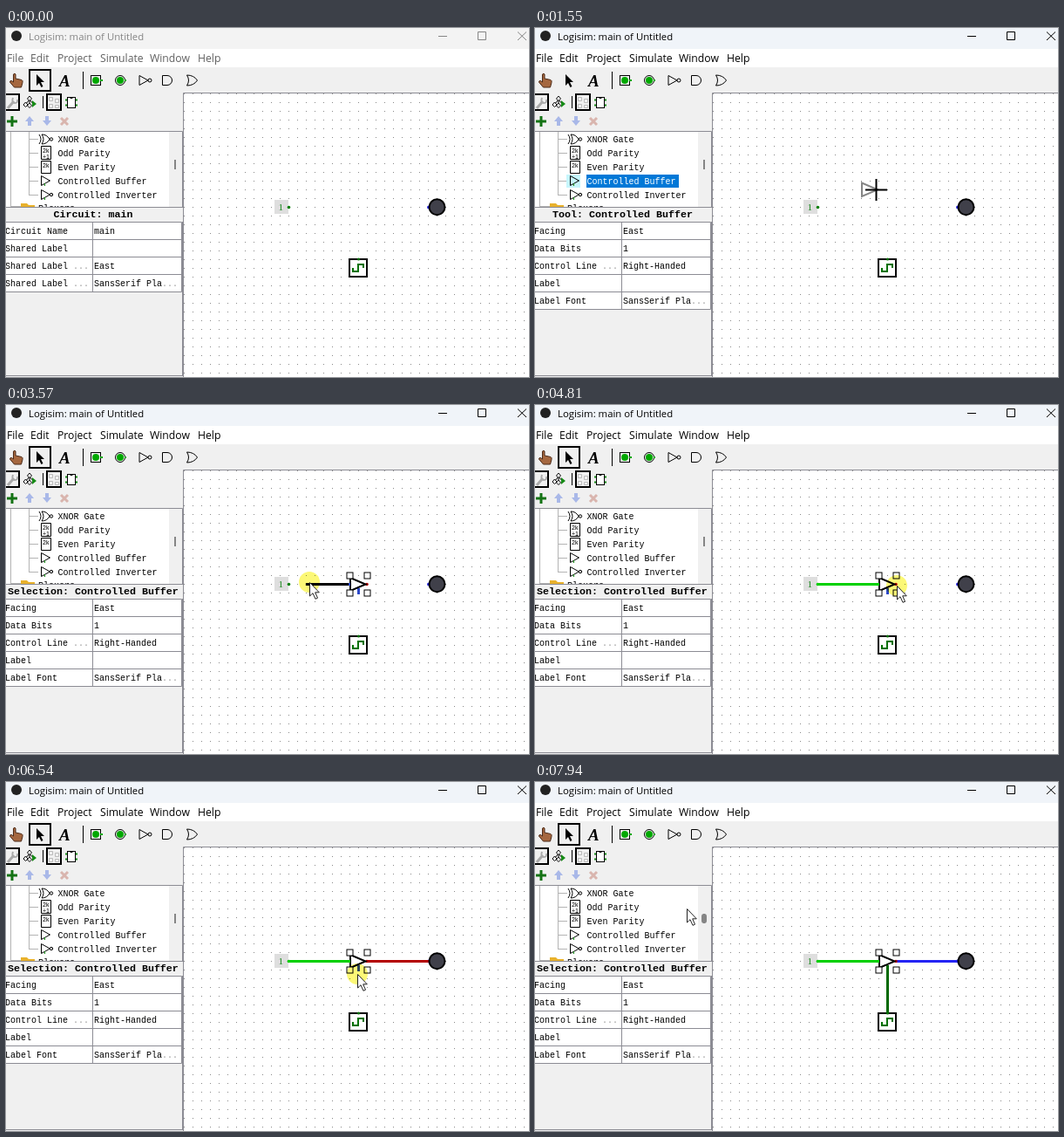
Animation, 600 px wide and 400 px high, one loop 8000 ms. Source, as an HTML page:

```html
<!DOCTYPE html>
<html lang="en">
<head>
<meta charset="utf-8">
<title>Controlled buffer wiring</title>
<style>
html, body { margin: 0; width: 100%; height: 100%; overflow: hidden; }
svg { display: block; width: 600px; height: 400px; }
.ui { font: 12.2px "Open Sans", "Noto Sans", sans-serif; }
.mono { font: 10px "Liberation Mono", "DejaVu Sans Mono", monospace; white-space: pre; }
.head { font: bold 11.67px "Liberation Mono", monospace; }
.line { fill: none; stroke: #000; }
.pane { fill: none; stroke: #8c8c94; }
.dots { fill: #999; }

/* Everything shares one 8 s clock; states switch hard. */
.on, .title, .menu, .move { animation: 8s step-end infinite; }
.on { visibility: hidden; }

.title { animation-name: title; }
@keyframes title { 0% { color: #858585 } 8.5%, 100% { color: #000 } }
.menu { animation-name: menu; }
@keyframes menu { 0% { color: #606060 } 8.5%, 100% { color: #000 } }

.idle { animation-name: idle; }
@keyframes idle { 0% { visibility: visible } 8.5%, 100% { visibility: hidden } }
.tool { animation-name: tool; }
@keyframes tool { 0%, 30%, 100% { visibility: hidden } 8.5% { visibility: visible } }
.gate { animation-name: gate; }
@keyframes gate { 0% { visibility: hidden } 8.5%, 100% { visibility: visible } }
.placed { animation-name: placed; }
@keyframes placed { 0% { visibility: hidden } 30%, 100% { visibility: visible } }
.select { animation-name: select; }
@keyframes select { 0%, 30%, 100% { visibility: visible } 8.5% { visibility: hidden } }

.cross { animation-name: cross; }
@keyframes cross { 0%, 30%, 100% { visibility: hidden } 16.4% { visibility: visible } }
.arrow { animation-name: arrow; }
@keyframes arrow { 0%, 30%, 100% { visibility: visible } 16.4% { visibility: hidden } }
.press { animation-name: press; }
@keyframes press {
  0%, 10.5%, 31%, 51.375%, 71%, 92.5%, 100% { visibility: hidden }
  8.5%, 30%, 41.625%, 60.125%, 81.75% { visibility: visible }
}

.high { animation-name: high; }
@keyframes high { 0% { visibility: hidden } 51.375%, 100% { visibility: visible } }
.error { animation-name: error; }
@keyframes error { 0%, 92.5%, 100% { visibility: hidden } 71% { visibility: visible } }
.float { animation-name: float; }
@keyframes float { 0% { visibility: hidden } 92.5%, 100% { visibility: visible } }
.hover { animation-name: hover; }
@keyframes hover { 0% { visibility: hidden } 98.25%, 100% { visibility: visible } }

.drag1 { animation-name: drag1; transform-origin: 395px 205px; }
@keyframes drag1 {
  0% { transform: scaleX(0) }
  41.625% { transform: scaleX(0); animation-timing-function: steps(3, jump-both) }
  44.625% { transform: scaleX(.72) }
  45.625% { transform: scaleX(.72); animation-timing-function: steps(2, jump-both) }
  47.625% { transform: scaleX(1) }
  51.375%, 100% { transform: scaleX(0) }
}
.drag2 { animation-name: drag2; transform-origin: 413px 205px; }
@keyframes drag2 {
  0% { transform: scaleX(0) }
  61.125% { transform: scaleX(0); animation-timing-function: steps(6, jump-both) }
  67.125% { transform: scaleX(1) }
  71%, 100% { transform: scaleX(0) }
}
.drag3 { animation-name: drag3; transform-origin: 404px 214px; }
@keyframes drag3 {
  0% { transform: scaleY(0) }
  82.75% { transform: scaleY(0); animation-timing-function: steps(7, jump-both) }
  89.625% { transform: scaleY(1) }
  92.5%, 100% { transform: scaleY(0) }
}

.pointer { animation-name: pointer; }
@keyframes pointer {
  0% { transform: translate(622px, 331px) }
  .875% { transform: translate(622px, 331px); animation-timing-function: steps(6, jump-both) }
  6.625% { transform: translate(48px, 176px) }
  11.5% { transform: translate(48px, 176px); animation-timing-function: steps(7, jump-both) }
  18.375% { transform: translate(281px, 185px) }
  19.375% { transform: translate(391px, 185px) }
  20.375% { transform: translate(391px, 185px); animation-timing-function: steps(6, jump-both) }
  26.25% { transform: translate(414px, 205px) }
  31% { transform: translate(414px, 205px); animation-timing-function: steps(4, jump-both) }
  34.875% { transform: translate(404px, 222px) }
  35.875% { transform: translate(404px, 222px); animation-timing-function: steps(3, jump-both) }
  38.875% { transform: translate(391px, 204px) }
  41.625% { transform: translate(391px, 204px); animation-timing-function: steps(3, jump-both) }
  44.625% { transform: translate(348px, 203px) }
  45.625% { transform: translate(348px, 203px); animation-timing-function: steps(2, jump-both) }
  47.625% { transform: translate(327px, 204px) }
  51.375% { transform: translate(327px, 204px); animation-timing-function: steps(7, jump-both) }
  58.125% { transform: translate(415px, 207px) }
  61.125% { transform: translate(415px, 207px); animation-timing-function: steps(6, jump-both) }
  67.125% { transform: translate(482px, 206px) }
  71% { transform: translate(482px, 206px); animation-timing-function: steps(7, jump-both) }
  77.75% { transform: translate(403px, 220px) }
  82.75% { transform: translate(403px, 220px); animation-timing-function: steps(7, jump-both) }
  89.625% { transform: translate(406px, 264px) }
  94.5% { transform: translate(406px, 264px); animation-timing-function: steps(5, jump-both) }
  99.25%, 100% { transform: translate(174px, 145px) }
}
</style>
</head>
<body>
<svg viewBox="0 0 600 400">
  <defs>
    <pattern id="grid" x="204" y="75" width="10" height="10" patternUnits="userSpaceOnUse">
      <rect width="1" height="1" fill="#8a8a8a"/>
    </pattern>
    <clipPath id="tree"><rect y="119" width="187" height="86"/></clipPath>
    <path id="buf" d="M0 -5.5V5.5L10 0Z"/>
    <path id="or" d="M0 -6Q8 -6 12 0Q8 6 0 6Q4 0 0 -6Z"/>
    <rect id="handle" x="-3.5" y="-3.5" width="7" height="7" fill="#fff" stroke="#000"/>
  </defs>

  <rect width="600" height="400" fill="#f0f0f0"/>
  <rect width="600" height="24" fill="#f0f4f9"/>
  <rect class="on idle" width="600" height="24" fill="#f3f3f3"/>
  <rect y="24" width="600" height="21" fill="#fff"/>

  <!-- window frame and menu -->
  <circle cx="12" cy="9" r="6" fill="#222"/>
  <g class="title">
    <text class="ui" x="26" y="14" style="font-size:11.35px" fill="currentColor">Logisim: main of Untitled</text>
    <path d="M496 9.5H506M541.5 4.5H550.5V13.5H541.5ZM587 4.5L597 14M597 4.5L587 14" fill="none" stroke="currentColor"/>
  </g>
  <g class="menu">
    <g class="ui" fill="currentColor">
      <text x="1" y="39">File</text>
      <text x="28" y="39">Edit</text>
      <text x="59" y="39">Project</text>
      <text x="108" y="39">Simulate</text>
      <text x="165" y="39">Window</text>
      <text x="220" y="39">Help</text>
    </g>
  </g>

  <!-- main toolbar -->
  <path d="M8.5 53q1.5-1.5 2.5 0v5l7 1.5q1.5 .5 1 3l-1.5 5.5h-8l-5-6q0-2 2-1.5l2 1.5z" fill="#a5673f" stroke="#4b2a18"/>
  <rect class="on select line" x="27" y="48" width="24" height="24" stroke-width="2"/>
  <path d="M35 53V66L38 63L40.5 68L42.5 67L40 62H44Z"/>
  <text x="61" y="67" font-family="Liberation Serif, serif" font-size="19" font-weight="bold" font-style="italic">A</text>
  <path class="line" d="M88.5 50V70" stroke="#888"/>
  <rect class="line" x="97.5" y="54.5" width="11" height="11"/>
  <circle cx="103" cy="60" r="4" fill="#00a800"/>
  <circle class="line" cx="131" cy="60" r="5.5"/>
  <circle cx="131" cy="60" r="4" fill="#00a800"/>
  <path d="M108 60H111M136 60H138" stroke="#00a800" stroke-width="2"/>
  <use href="#buf" class="line" x="153" y="60"/>
  <circle class="line" cx="165" cy="60" r="2"/>
  <path class="line" d="M179.5 54.5H185A5.5 5.5 0 0 1 185 65.5H179.5Z"/>
  <use href="#or" class="line" x="207.5" y="60"/>

  <!-- explorer toolbars -->
  <rect class="line" x="-1" y="76" width="16" height="18" stroke-width="2"/>
  <path d="M2 92L9 84" stroke="#aaa" stroke-width="3"/>
  <path d="M8 80Q6 85 10 86Q14 86 13 82" fill="none" stroke="#aaa" stroke-width="2"/>
  <path class="line" d="M27 82L22 88M27 82L32 88M27 82V90"/>
  <path d="M27 78l2.5 3-2.5 2.5-2.5-2.5zM22.5 85l2.5 3-2.5 2.5-2.5-2.5zM27 86l2.5 3-2.5 2.5-2.5-2.5z" fill="#fff" stroke="#000"/>
  <path d="M30 83l5 4-5 4z" fill="#168b16"/>
  <path class="line" d="M42.5 78V92" stroke="#888"/>
  <rect class="line" x="47" y="76" width="16" height="18" stroke-width="2"/>
  <path d="M49.5 79.5h4v4h-4zM56.5 81.5h4v4h-4zM49.5 87.5h4v4h-4zM56.5 88.5h4v3h-4z" fill="none" stroke="#bbb"/>
  <rect x="70.5" y="79.5" width="9" height="12" fill="#fff" stroke="#000"/>
  <path d="M73 79.5q2 3 4 0" class="line"/>
  <path d="M68 82.5h2M68 88.5h2M80 82.5h2M80 88.5h2" stroke="#168b16" stroke-width="2"/>
  <path d="M7 101V113M1 107H13" stroke="#147314" stroke-width="3"/>
  <path id="up" d="M27 101L32 107H29V112H25V107H22Z" fill="#a9b8e8"/>
  <use href="#up" transform="matrix(1 0 0 -1 20 213)"/>
  <path d="M63 103L71 111M71 103L63 111" stroke="#d9b5ae" stroke-width="3"/>

  <!-- component tree -->
  <rect y="119" width="187" height="86" fill="#fff"/>
  <g clip-path="url(#tree)">
    <path d="M5.5 119V205M26.5 119V192M26 127.5H37M26 143.5H37M26 159.5H37M26 175.5H37M26 191.5H37M5 204.5H17" fill="none" stroke="#b4b4b4"/>
    <path class="line" d="M38 122q4 5.5 0 11M41 122q6 0 9 5.5q-3 5.5-9 5.5q4-5.5 0-11z"/>
    <circle class="line" cx="52" cy="127.5" r="1.7"/>
    <path d="M40.5 135.5h11v15h-11zM40.5 152.5h11v14h-11z" fill="#fff" stroke="#000"/>
    <g font-family="Liberation Sans, sans-serif" font-size="7">
      <text x="42" y="143">2k</text><text x="42" y="150">+1</text><text x="42" y="160">2k</text>
    </g>
    <rect class="on tool" x="36" y="168" width="16" height="15" fill="#c5f5fc"/>
    <use href="#buf" class="line" x="40.5" y="175"/>
    <use href="#buf" class="line" x="40.5" y="191"/>
    <circle class="line" cx="52" cy="191" r="1.7"/>
    <path d="M44.5 178V181M44.5 194V197" stroke="#168b16"/>
    <path d="M17 205V201H24L26 203H33V205Z" fill="#e8b12c"/>
    <g class="mono">
      <text x="59.5" y="131">XNOR Gate</text>
      <text x="59.5" y="147">Odd Parity</text>
      <text x="59.5" y="163">Even Parity</text>
      <text x="59.5" y="179">Controlled Buffer</text>
      <text x="59.5" y="195">Controlled Inverter</text>
      <text x="37" y="210">Plexers</text>
      <g class="on tool">
        <rect x="59" y="168" width="106" height="15" fill="#0078d7"/>
        <text x="59.5" y="179" fill="#fff">Controlled Buffer</text>
      </g>
    </g>
  </g>
  <path d="M194 151V162" stroke="#858585" stroke-width="2"/>
  <rect class="on hover" x="191" y="151" width="6" height="11" rx="3" fill="#858585"/>
  <path class="pane" d="M0 118.5H202.5V205.5M0 205.5H203"/>

  <!-- attribute table -->
  <text class="head on idle" x="54.5" y="217">Circuit: main</text>
  <text class="head on tool" x="20" y="217">Tool: Controlled Buffer</text>
  <text class="head on placed" x="2" y="217">Selection: Controlled Buffer</text>
  <g class="on idle">
    <rect y="222" width="201" height="80" fill="#fff"/>
    <path class="pane" d="M0 222.5H201.5V302.5H0M0 242.5H201M0 262.5H201M0 282.5H201M99.5 222V302"/>
    <g class="mono">
      <text x="-1" y="236">Circuit Name</text><text x="101" y="236">main</text>
      <text x="-1" y="256">Shared Label</text>
      <text x="-1" y="276">Shared Label <tspan class="dots">...</tspan></text><text x="101" y="276">East</text>
      <text x="-1" y="296">Shared Label <tspan class="dots">...</tspan></text>
      <text x="101" y="296">SansSerif Pla<tspan class="dots">...</tspan></text>
    </g>
  </g>
  <g class="on gate">
    <rect y="222" width="201" height="100" fill="#fff"/>
    <path class="pane" d="M0 222.5H201.5V322.5H0M0 242.5H201M0 262.5H201M0 282.5H201M0 302.5H201M99.5 222V322"/>
    <g class="mono">
      <text x="-1" y="236">Facing</text><text x="101" y="236">East</text>
      <text x="-1" y="256">Data Bits</text><text x="101" y="256">1</text>
      <text x="-1" y="276">Control Line <tspan class="dots">...</tspan></text><text x="101" y="276">Right-Handed</text>
      <text x="-1" y="296">Label</text>
      <text x="-1" y="316">Label Font</text>
      <text x="101" y="316">SansSerif Pla<tspan class="dots">...</tspan></text>
    </g>
  </g>
  <path class="pane" d="M202.5 222V399M0 398.5H203"/>

  <!-- canvas -->
  <rect x="204" y="75" width="396" height="325" fill="#fff"/>
  <rect x="204" y="75" width="396" height="325" fill="url(#grid)"/>
  <path class="pane" d="M600 74.5H203.5V400"/>

  <rect x="308" y="197" width="16" height="16" fill="#dedede"/>
  <text x="312.5" y="209" font-family="Liberation Serif, serif" font-size="11" fill="#16851a">1</text>
  <circle cx="324.5" cy="205.5" r="1.8" fill="#087f08"/>
  <circle cx="485" cy="205.5" r="2" fill="#2828e8"/>

  <rect class="move drag1" x="324" y="204" width="71" height="3"/>
  <rect class="move drag2" x="413" y="204" width="72" height="3"/>
  <rect class="move drag3" x="403" y="214" width="3" height="51"/>
  <rect class="on high" x="323" y="204" width="72" height="3" fill="#00d000"/>
  <rect class="on error" x="413" y="204" width="73" height="3" fill="#b40000"/>
  <rect class="on float" x="413" y="204" width="73" height="3" fill="#2424f4"/>

  <circle cx="494.5" cy="205.3" r="9" fill="#40404a" stroke="#000" stroke-width="2"/>
  <rect x="394" y="265" width="20" height="20" fill="#fff" stroke="#000" stroke-width="2"/>
  <path d="M398 275V279H404V271H410V275" fill="none" stroke="#007000" stroke-width="2"/>
  <circle cx="404.5" cy="265" r="1.5" fill="#007000"/>

  <g class="on placed">
    <rect x="403" y="210" width="3" height="7" fill="#2c48c8"/>
    <circle cx="414" cy="205.5" r="1.8" fill="#b40000"/>
    <rect class="on float" x="403" y="210" width="3" height="55" fill="#006800"/>
    <path d="M395 198V213L412.5 205.5Z" fill="#fff" stroke="#000" stroke-width="2"/>
    <rect x="393" y="204" width="2" height="3" fill="#2c48c8"/>
    <rect class="on high" x="389" y="204" width="6" height="3" fill="#00d000"/>
    <use href="#handle" x="394.5" y="195.5"/>
    <use href="#handle" x="414.5" y="195.5"/>
    <use href="#handle" x="394.5" y="215.5"/>
    <use href="#handle" x="414.5" y="215.5"/>
  </g>

  <!-- pointer -->
  <g class="move pointer" style="mix-blend-mode:multiply">
    <circle class="on press" r="12" fill="#fcf876"/>
  </g>
  <g class="move pointer">
    <g class="on cross">
      <path d="M-16 -7.5V8L2 .3Z" fill="none" stroke="#858585" stroke-width="2"/>
      <path d="M-12 .5H13M.5 -12V13" stroke="#000" stroke-width="2"/>
    </g>
    <path class="on arrow" d="M.5 .5V16L4 12.7L7 19.3L9.5 18.2L6.7 11.8H11.3Z" fill="#fff" stroke="#222"/>
  </g>
</svg>
</body>
</html>
```
